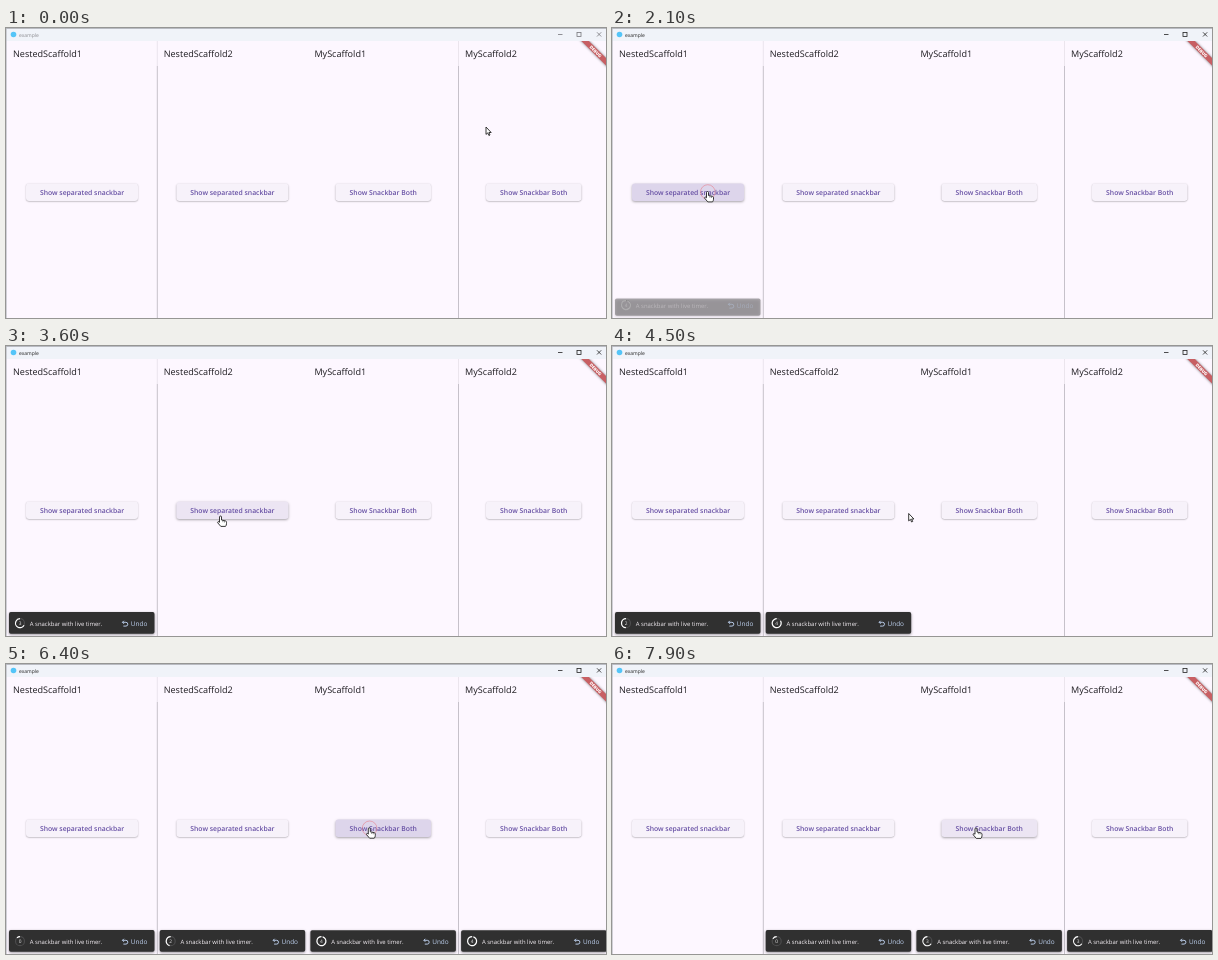
An HTML page with a canvas for the animation above (8 s loop, 600 by 290 pixels).

```html
<!DOCTYPE html>
<html lang="en">
<head>
<meta charset="utf-8">
<title>Snackbars</title>
<style>
html, body { margin: 0; width: 100%; height: 100%; overflow: hidden; background: #fdf7ff; }
canvas { display: block; width: 600px; height: 290px; }
</style>
</head>
<body>
<canvas id="stage"></canvas>
<script>
const W = 600, H = 290, LOOP = 8000;
const canvas = document.getElementById('stage');
const ratio = window.devicePixelRatio || 1;
canvas.width = W * ratio;
canvas.height = H * ratio;
const g = canvas.getContext('2d');

const COLUMN = 150.7;
const titles = ['NestedScaffold1', 'NestedScaffold2', 'MyScaffold1', 'MyScaffold2'];
const buttons = [
  { x: 20, w: 112, label: 'Show separated snackbar' },
  { x: 170.4, w: 112, label: 'Show separated snackbar' },
  { x: 329.5, w: 95.5, label: 'Show Snackbar Both' },
  { x: 480, w: 95.5, label: 'Show Snackbar Both' }
];

// Opening time of the snackbar in each column
const snackStart = [1982, 3700, 6170, 6170];
const SNACK_LIFE = 5000, SNACK_FADE = 250;

// Pointer path: time, x, y
const route = [
  [30, 480, 99], [780, 95.5, 163.5],
  [2680, 95.5, 163.5], [3350, 214.5, 170],
  [3900, 214.5, 170], [4400, 296.7, 167.5],
  [4950, 296.7, 167.5], [5500, 363.3, 163.8],
  [7200, 363.3, 163.8], [7350, 364, 164]
];

// Hover spans and presses: button, from, to
const hovers = [[0, 730, 2800], [1, 3140, 4080], [2, 5220, 9000]];
const presses = [[0, 1900, 2150], [1, 3620, 3800], [2, 6120, 6420]];

const arrow = new Path2D('M0 0V7.4L1.7 5.9 2.9 8.5 4 8 2.9 5.5H5.2Z');
const hand = new Path2D('M-1 1a1 1 0 0 1 2 0v3l4 .9q1 .3 1 1.4v1.4q0 1.5-1 2.7H.3L-2.6 7q-.7-1 .2-1.4.7-.2 1.4.7z');
const undo = new Path2D('M-2.5-1.3H.9A1.9 1.9 0 0 1 .9 2.5H-1.6M-1.1-2.8L-2.6-1.3-1.1.2');

const clamp = v => Math.max(0, Math.min(1, v));
const ease = v => v * v * (3 - 2 * v);
const ramp = (t, from, length) => clamp((t - from) / length);

function text(str, x, y, size, color, weight = 400, align = 'left') {
  g.font = `${weight} ${size}px "Open Sans", "Noto Sans", sans-serif`;
  g.fillStyle = color;
  g.textAlign = align;
  g.fillText(str, x, y);
}

function box(x, y, w, h, r, color) {
  g.fillStyle = color;
  g.beginPath();
  g.roundRect(x, y, w, h, r);
  g.fill();
}

function shadow(color, blur, dy) {
  g.shadowColor = color;
  g.shadowBlur = blur * ratio;
  g.shadowOffsetY = dy * ratio;
}

function line(color, width, ...points) {
  g.strokeStyle = color;
  g.lineWidth = width;
  g.beginPath();
  for (let i = 0; i < points.length; i += 4) {
    g.moveTo(points[i], points[i + 1]);
    g.lineTo(points[i + 2], points[i + 3]);
  }
  g.stroke();
}

function windowBar(active) {
  g.fillStyle = '#f0f3f9';
  g.fillRect(0, 0, W, 13);
  g.fillStyle = '#54c5f8';
  g.beginPath();
  g.arc(7.5, 6.5, 2.8, 0, 7);
  g.fill();
  text('example', 13, 8.5, 5, active ? '#222' : '#8b8b90');
  const ink = active ? '#222' : '#77777c';
  line(ink, 0.8, 552, 6.5, 556.5, 6.5, 591, 4.3, 595.2, 8.5, 595.2, 4.3, 591, 8.5);
  g.strokeRect(571, 4.4, 4, 4);
  line('#8d9096', 0.8, 0, 0.2, W, 0.2);
}

function banner() {
  g.save();
  g.beginPath();
  g.rect(0, 13, W, H);
  g.clip();
  g.translate(W, 13);
  g.rotate(Math.PI / 4);
  g.save();
  shadow('rgba(0,0,0,.5)', 2.6, 0);
  box(-20, 12.1, 40, 5.3, 0, '#c85f63');
  g.restore();
  text('DEBUG', 0, 16.3, 4.3, '#fff', 800, 'center');
  g.restore();
}

function drawButton(i, t) {
  const { x, w, label } = buttons[i];
  let hover = 0, press = 0;
  for (const [n, from, to] of hovers)
    if (n === i) hover = Math.max(hover, ramp(t, from, 120) - ramp(t, to, 120));
  for (const [n, from, to] of presses)
    if (n === i) press = Math.max(press, ramp(t, from, 140) - ramp(t, to, 250));
  g.save();
  shadow('rgba(0,0,0,.34)', 1.5 + hover, 0.6 + hover * 0.4);
  box(x, 155.4, w, 17.6, 3, '#f7f2fa');
  g.restore();
  box(x, 155.4, w, 17.6, 3, `rgba(103,80,164,${0.08 * hover + 0.1 * press})`);
  text(label, x + w / 2, 166.7, 6.82, '#6750a4', 600, 'center');
}

function drawSnack(i, t) {
  const age = t - snackStart[i];
  const exit = ramp(age, SNACK_LIFE + SNACK_FADE, SNACK_FADE);
  if (age < 0 || exit === 1) return;
  const open = clamp(age / SNACK_FADE);
  const grow = (1 - (1 - open) ** 2.5) * (1 - exit ** 2.5);
  const top = 287.7 - 21.6 * grow;

  g.save();
  g.translate(i * COLUMN, 0);
  g.globalAlpha = clamp((open - 0.4) / 0.2) * (1 - exit);
  g.save();
  shadow('rgba(0,0,0,.4)', 3, 1);
  box(3, top, 145.5, 287.7 - top, 1.8, '#303030');
  g.restore();

  const done = clamp(age / SNACK_LIFE);
  const left = Math.floor(Math.max(0, SNACK_LIFE - age) / 1000);
  g.lineWidth = 1.2;
  g.strokeStyle = '#4b4b4c';
  g.beginPath();
  g.arc(14, 277.2, 4.5, 0, Math.PI * 2);
  g.stroke();
  g.strokeStyle = '#fff';
  g.beginPath();
  g.arc(14, 277.2, 4.5, Math.PI * (2 * done - 0.5), Math.PI * 1.5);
  g.stroke();
  text(left, 14, 279, 4.8, '#eee', 400, 'center');
  text('A snackbar with live timer.', 23.8, 279.6, 5.93, '#f4eff4');
  text('Undo', 124.8, 279.8, 6.45, '#bdd0ee');
  g.translate(119, 277.6);
  g.strokeStyle = '#bdd0ee';
  g.lineWidth = 0.95;
  g.stroke(undo);
  g.restore();
}

function pointerAt(t) {
  let a = route[0];
  for (const b of route) {
    if (t < b[0]) {
      const k = ease(ramp(t, a[0], b[0] - a[0] || 1));
      return [a[1] + (b[1] - a[1]) * k, a[2] + (b[2] - a[2]) * k];
    }
    a = b;
  }
  return [a[1], a[2]];
}

function drawPointer(t) {
  const [x, y] = pointerAt(t);
  for (const [, from, to] of presses) {
    const fade = ramp(t, from, 80) - ramp(t, to, 200);
    if (fade <= 0) continue;
    g.strokeStyle = `rgba(232,120,130,${0.6 * fade})`;
    g.lineWidth = 0.9;
    g.beginPath();
    g.arc(x + 0.3, y + 0.5, 4 + 3.3 * ramp(t, from, 180), 0, 7);
    g.stroke();
  }
  const over = buttons.some(b => x >= b.x && x <= b.x + b.w) && y > 155 && y < 173;
  const shape = over ? hand : arrow;
  g.save();
  g.translate(x, y);
  g.lineJoin = 'round';
  g.lineWidth = 0.9;
  g.fillStyle = '#fff';
  g.strokeStyle = '#222';
  g.fill(shape);
  g.stroke(shape);
  if (over) line('#222', 0.5, 2.4, 4.7, 2.4, 6.2, 4, 5.1, 4, 6.5);
  g.restore();
}

function render(t) {
  g.setTransform(ratio, 0, 0, ratio, 0, 0);
  g.textRendering = 'geometricPrecision';
  g.fillStyle = '#fdf7ff';
  g.fillRect(0, 0, W, H);
  windowBar(t >= 1900);
  titles.forEach((title, i) => text(title, 7 + i * COLUMN, 29.2, 9.07, '#1d1b20'));
  for (const x of [151.3, 452.5]) {
    line('#e6e0e9', 0.8, x, 13, x, 38);
    line('#c6c1ca', 1, x, 38, x, H);
  }
  line('#b9bac0', 0.8, 0.3, 0, 0.3, H);
  buttons.forEach((_, i) => drawButton(i, t));
  snackStart.forEach((_, i) => drawSnack(i, t));
  banner();
  drawPointer(t);
}

const begin = performance.now();
function tick() {
  render((performance.now() - begin) % LOOP);
  requestAnimationFrame(tick);
}
tick();
</script>
</body>
</html>
```
